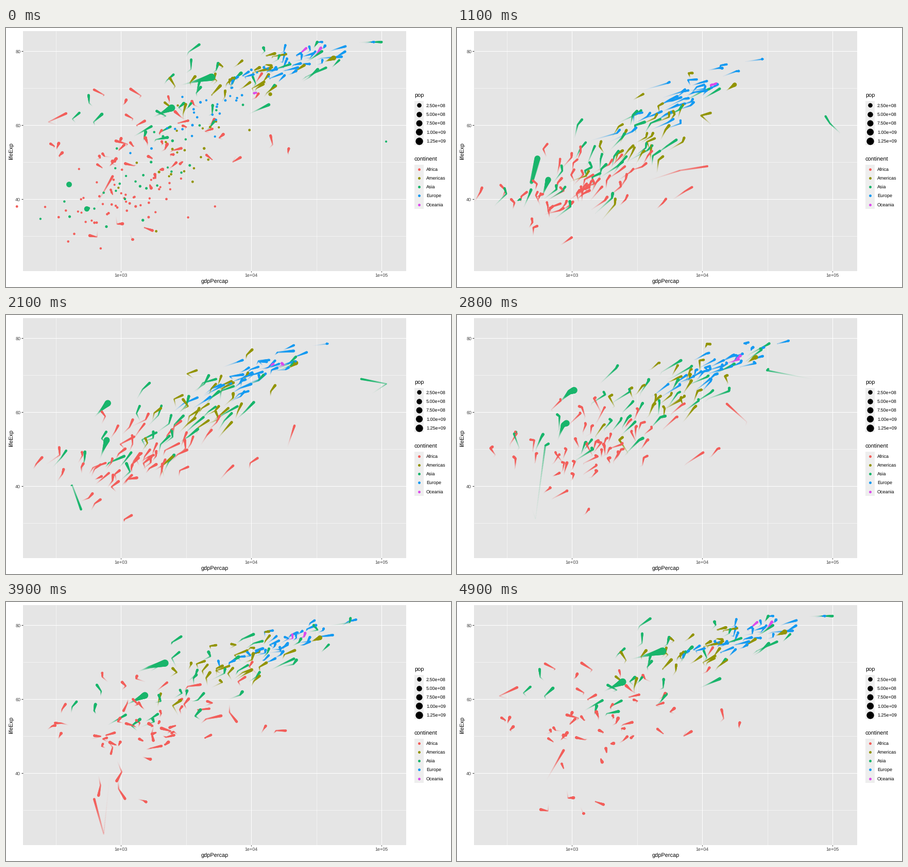
A matplotlib script that plays this animation: 864x504 px, repeating every 5 s.

```python
import numpy as np
import matplotlib.pyplot as plt
from matplotlib.animation import FuncAnimation
from matplotlib.colors import to_rgb
from matplotlib.patches import Rectangle
from matplotlib.path import Path

WIDTH, HEIGHT, DPI = 864, 504, 72
FRAMES, INTERVAL = 50, 100
STEPS, WAKE = 500, 75
LEFT, RIGHT, TOP, BOTTOM = 33, 777, 5.5, 472.5
YEARS = np.arange(1952, 2008, 5)
COLORS = {"Africa": "#F35E5A", "Americas": "#929400", "Asia": "#18B56B",
          "Europe": "#149AF2", "Oceania": "#DC4CEB"}
GROWTH = {"Africa": .026, "Americas": .017, "Asia": .015, "Europe": .004, "Oceania": .013}

# Mean and spread of log10 gdp and of life expectancy in 1952, 1982 and 2007.
CLOUDS = {
    "Africa": dict(count=50, gdp=(2.98, 3.2, 3.23), gdp_sd=(.27, .35, .4),
                   life=(39, 51.6, 55.5), life_sd=(4.6, 6.5, 8), link=.45, setback=.2),
    "Americas": dict(count=24, gdp=(3.5, 3.75, 3.92), gdp_sd=(.22, .23, .26),
                     life=(53, 66, 73.4), life_sd=(8.5, 6, 3.5), link=.65, setback=0),
    "Asia": dict(count=30, gdp=(3.17, 3.58, 3.77), gdp_sd=(.32, .45, .52),
                 life=(47, 63, 71.2), life_sd=(8.5, 7.5, 7), link=.8, setback=0),
    "Europe": dict(count=30, gdp=(3.7, 4.15, 4.34), gdp_sd=(.25, .2, .24),
                   life=(64.8, 72.8, 77.6), life_sd=(5, 2.6, 2.5), link=.8, setback=0),
    "Oceania": dict(count=2, gdp=(4.01, 4.27, 4.47), gdp_sd=(.02, .03, .09),
                    life=(69.2, 74.3, 80.7), life_sd=(.3, .6, .6), link=1, setback=0)}

# Countries far from their cloud: continent, population in 1982, {year: (gdp, life)}.
OUTLIERS = [
    ("Asia", 1, {1952: (108382, 55.6), 1957: (113523, 58), 1962: (95458, 60.5), 1967: (80895, 64.6),
                 1972: (109348, 67.7), 1982: (31354, 71.3), 2007: (47307, 77.6)}),
    ("Asia", 906, {1952: (400, 44), 1957: (576, 50.5), 1962: (488, 44.5), 1967: (613, 58.4),
                   1982: (962, 65.5), 1992: (1656, 68.7), 2007: (4959, 73)}),
    ("Asia", 763, {1952: (547, 37.4), 1982: (856, 56.6), 2007: (2452, 64.7)}),
    ("Asia", 7, {1952: (368, 39.4), 1972: (422, 40.3), 1977: (525, 31.2), 1982: (624, 51),
                 2007: (1714, 59.7)}),
    ("Africa", 6, {1952: (494, 40), 1987: (848, 44), 1992: (737, 23.6), 1997: (590, 36.1),
                   2007: (863, 46.2)}),
    ("Africa", 3, {1952: (2388, 42.7), 1962: (6757, 47.8), 1967: (18773, 50.2), 1977: (21951, 57.4),
                   1992: (9640, 68.8), 2007: (12057, 74)}),
    ("Americas", 232, {1952: (13990, 68.4), 1982: (25010, 74.7), 2007: (42952, 78.2)})]

rng = np.random.default_rng(12)
time = np.linspace(1952, 2007, STEPS)


def px(log_gdp):
    return 223.2 + 253 * (log_gdp - 3)


def py(life):
    return 189.3 - 7.2 * (life - 60)


def point_size(millions):
    return 1 + 5 * np.sqrt(np.clip(millions / 1319, 0, 1))


def diameter(size):
    return 0.75 * (2.845 * size + 0.945) + 1.1


def even_scores(count):
    """Shuffled, evenly filled bell curve, so that no cloud has gaps or strays."""
    u = (np.arange(count) + .5) / count
    return rng.permutation(np.log(u / (1 - u)) / 1.7)


def drift(start, keep):
    """Scores that move slowly from their start to partly new ones."""
    end = keep * start + np.sqrt(1 - keep ** 2) * even_scores(len(start))
    return start[:, None] + (end - start)[:, None] * (YEARS - 1952) / 55


def over_years(values):
    return np.interp(YEARS, (1952, 1982, 2007), values)


def cloud_paths(count, gdp, gdp_sd, life, life_sd, link, setback):
    wealth = even_scores(count)
    health = link * wealth + np.sqrt(1 - link ** 2) * even_scores(count)
    log_gdp = over_years(gdp) + over_years(gdp_sd) * drift(wealth, .9)
    years_lived = over_years(life) + over_years(life_sd) * drift(health, .9)
    log_gdp += rng.normal(0, .03, log_gdp.shape)
    years_lived += rng.normal(0, .3, log_gdp.shape)
    hit = rng.random(count) < setback
    years_lived -= 11 * np.outer(hit, np.clip((YEARS - 1987) / 15, 0, 1))
    return log_gdp, np.minimum(years_lived, 82.5)


def outlier_path(points):
    known = list(points)
    gdp, life = np.transpose(list(points.values()))
    return np.interp(YEARS, known, np.log10(gdp)), np.interp(YEARS, known, life)


countries = []
for continent, cloud in CLOUDS.items():
    for log_gdp, life in zip(*cloud_paths(**cloud)):
        countries.append((continent, 10 ** rng.normal(.9, .45), log_gdp, life))
for continent, millions, points in OUTLIERS:
    countries.append((continent, millions, *outlier_path(points)))
rng.shuffle(countries := np.array(countries, dtype=object))

track = np.array([[px(np.interp(time, YEARS, gdp.astype(float))), py(np.interp(time, YEARS, life.astype(float)))]
                  for _, _, gdp, life in countries]).transpose(2, 0, 1)
track_size = np.array([point_size(millions * np.exp(GROWTH[continent] * (time - 1982)))
                       for continent, millions, _, _ in countries]).T

plt.rcParams.update({"font.family": "Liberation Sans", "text.hinting": "none", "text.hinting_factor": 1})
fig = plt.figure(figsize=(WIDTH / DPI, HEIGHT / DPI), dpi=DPI, facecolor="white")
ax = fig.add_axes([0, 0, 1, 1])
ax.set(xlim=(0, WIDTH), ylim=(HEIGHT, 0))
ax.axis("off")


def box(x0, y0, x1, y1, color):
    ax.add_patch(Rectangle((x0, y0), x1 - x0, y1 - y0, color=color, lw=0, zorder=0))


def line(xs, ys, width, color="white"):
    ax.plot(xs, ys, lw=width, color=color, solid_capstyle="butt", zorder=1)


def label(x, y, text, size=8.8, color="black", ha="left", rotation=0):
    ax.text(x, y, text, size=size, color=color, ha=ha, va="baseline",
            rotation=rotation, rotation_mode="anchor")


def legend(title, title_y, first_y, entries):
    label(793, title_y, title, 11)
    box(793, first_y - 8.64, 810.5, first_y + 17.28 * 4 + 8.64, "#EEEEEE")
    for i, (text, color, size) in enumerate(entries):
        y = first_y + 17.28 * i
        ax.scatter(801.9, y, s=diameter(size) ** 2, color=color, lw=0, zorder=3)
        label(816, y + 3.2, text)


box(LEFT, TOP, RIGHT, BOTTOM, "#E5E5E5")
for power in (2.5, 3.5, 4.5):
    line([px(power)] * 2, [TOP, BOTTOM], .53)
for life in (30, 50, 70):
    line([LEFT, RIGHT], [py(life)] * 2, .53)
for power in (3, 4, 5):
    line([px(power)] * 2, [TOP, BOTTOM], 1.07)
    line([px(power)] * 2, [BOTTOM, BOTTOM + 2.75], 1.07, "#333333")
    label(px(power), 484.4, f"1e+0{power}", color="#404040", ha="center")
for life in (40, 60, 80):
    line([LEFT, RIGHT], [py(life)] * 2, 1.07)
    line([LEFT - 2.75, LEFT], [py(life)] * 2, 1.07, "#333333")
    label(28.2, py(life) + 3.2, str(life), color="#404040", ha="right")
label(405, 496.8, "gdpPercap", 11, ha="center")
label(13.8, 239, "lifeExp", 11, ha="center", rotation=90)
legend("pop", 135, 150.4, [(f"{p * 1e6:.2e}", "black", point_size(p)) for p in range(250, 1251, 250)])
legend("continent", 259.2, 274.5, [(name, color, 1.5) for name, color in COLORS.items()])

# The wake: earlier positions, oldest first, shrinking and fading with age.
ages = np.arange(WAKE - 1, -1, -1)
fade = ((1 - ages / WAKE) ** 2)[:, None]
rgba = np.empty((WAKE, len(countries), 4))
rgba[..., :3] = [to_rgb(COLORS[country[0]]) for country in countries]
rgba[..., 3] = fade
dots = ax.scatter([], [], marker=Path.unit_regular_polygon(16), lw=0, zorder=2)
dots.set_facecolor(rgba.reshape(-1, 4))


def draw(frame):
    now = round(frame * (STEPS - 1) / (FRAMES - 1))
    steps = (now - ages) % STEPS
    dots.set_offsets(track[steps].reshape(-1, 2))
    dots.set_sizes((diameter(track_size[steps] * fade) ** 2).ravel())
    return dots,


anim = FuncAnimation(fig, draw, frames=FRAMES, interval=INTERVAL, repeat=True, repeat_delay=0)
plt.show()
```
